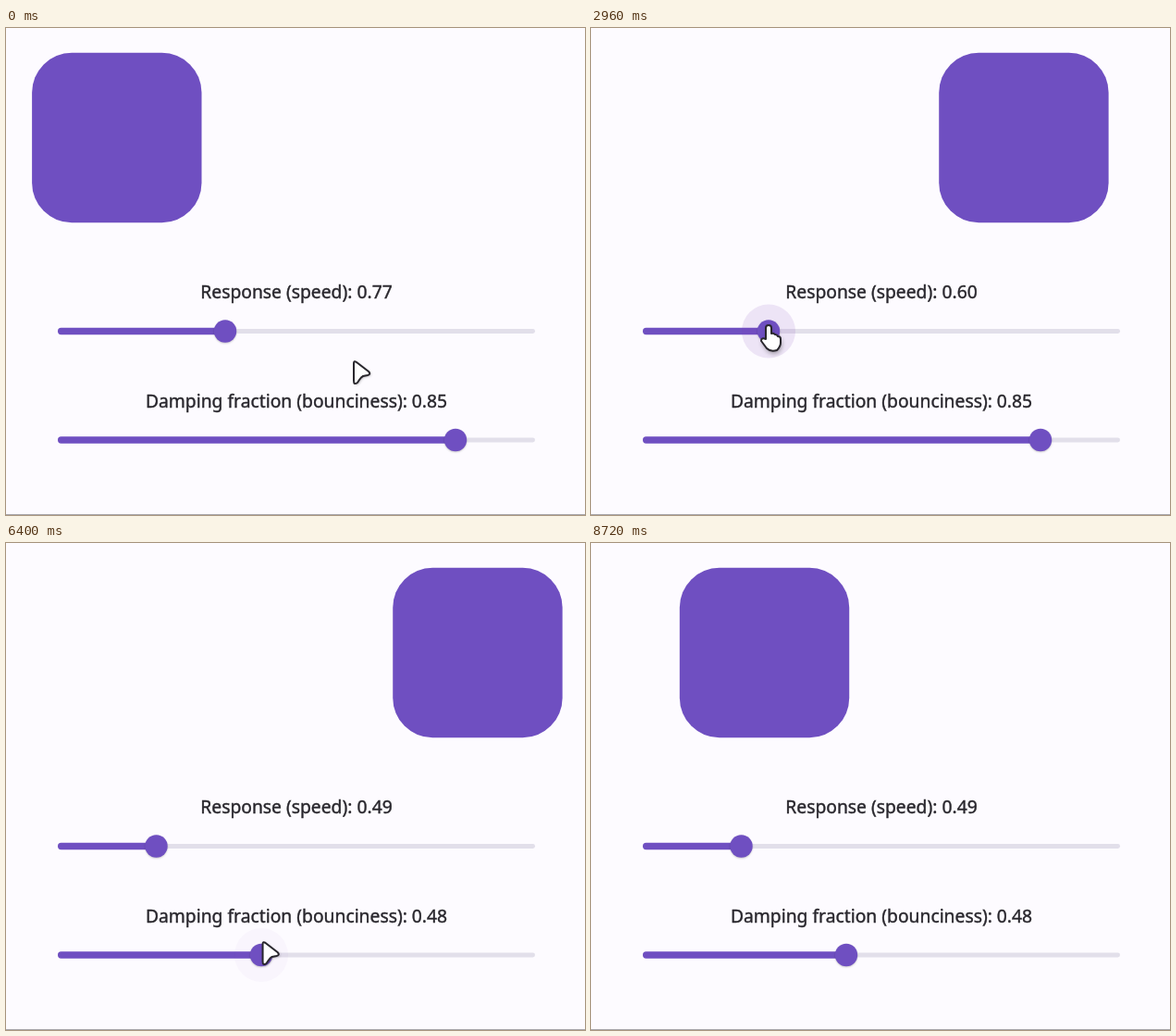
An HTML page with a canvas that plays this animation: 626x526 px, repeating every 8800 ms.

```html
<!DOCTYPE html>
<html lang="en">
<head>
<meta charset="utf-8">
<title>Spring playground</title>
<style>
  html, body { margin: 0; width: 100%; height: 100%; overflow: hidden; background: #fdfbff; }
  canvas { display: block; }
</style>
</head>
<body>
<canvas id="stage" width="626" height="526"></canvas>
<script>
const ctx = document.getElementById('stage').getContext('2d');
const LOOP = 8800, STEP = 80;
const PURPLE = '#6f4fc1', TRACK = '#e2dfea', INK = '#29272d';
const LEFT = 56, RIGHT = 572, CENTER = 314;

// The square jumps back and springs again whenever it has settled
const restarts = [0, 1330, 2661, 3680, 4631, 5494, 6630, 7570, 8668];

const arrow = new Path2D('M0 2Q0 -1 3 1L16 11Q19 14 15 15L10 16Q8 17 6 20L4 23Q0 26 0 21Z');
const hand = new Path2D('M-3 2Q-3 -1 0 -1Q3 -1 3 2V8Q5 7 7 9Q9 9 10 11Q13 11 13 14V18Q13 22 9 26Q2 28 -2 24L-8 16Q-8 12 -3 14Z');

// Goes smoothly from 0 to 1 between two times
function ease(t, from, to) {
  const p = Math.min(1, Math.max(0, (t - from) / (to - from)));
  return p * p * (3 - 2 * p);
}

const sliders = [
  {
    label: 'Response (speed)', y: 327.5, max: 2, grip: 5.5,
    enter: 1760, press: 2000, leave: 4080,
    x: t => 237 - 45 * ease(t, 2080, 2560) - 29.5 * ease(t, 3200, 3900)
  },
  {
    label: 'Damping fraction (bounciness)', y: 445, max: 1, grip: 10,
    enter: 4400, press: 4720, leave: 6400,
    x: t => 486 - 122.5 * ease(t, 4800, 5440) - 87.5 * ease(t, 5560, 6240)
  }
];
const [response, damping] = sliders;

const valueAt = (slider, t) =>
  .1 + (slider.x(t) - LEFT) / (RIGHT - LEFT) * (slider.max - .1);

function spring(seconds, response, damping) {
  const s = 2 * Math.PI / response * seconds, root = Math.sqrt(1 - damping * damping);
  return 1 - Math.exp(-damping * s) * (Math.cos(root * s) + damping / root * Math.sin(root * s));
}

function fillRound(x, y, w, h, r, color) {
  ctx.fillStyle = color;
  ctx.beginPath();
  ctx.roundRect(x, y, w, h, r);
  ctx.fill();
}

const disc = (x, y, r, color) => fillRound(x - r, y - r, 2 * r, 2 * r, r, color);

function shadow(blur, dx, dy, alpha) {
  ctx.shadowColor = `rgba(0,0,0,${alpha})`;
  ctx.shadowBlur = blur;
  ctx.shadowOffsetX = dx;
  ctx.shadowOffsetY = dy;
}

function drawSquare(t) {
  const start = restarts.findLast(time => time <= t);
  const progress = spring((t - start) / 1000, valueAt(response, start), valueAt(damping, start));
  fillRound(28.1 + 390 * progress, 26.8, 183.4, 183.4, 43, PURPLE);
}

function drawSlider(slider, t) {
  const { label, y, enter, press, leave } = slider, x = slider.x(t);
  const text = `${label}: ${valueAt(slider, t).toFixed(2)}`;
  ctx.fillStyle = ctx.strokeStyle = INK;
  ctx.lineWidth = .4;
  ctx.fillText(text, CENTER, y - 35.5);
  ctx.strokeText(text, CENTER, y - 35.5);

  fillRound(LEFT, y - 2.45, RIGHT - LEFT, 4.9, 2.4, TRACK);
  fillRound(LEFT, y - 3.65, x - LEFT, 7.3, 3.6, PURPLE);

  const hover = .07 * ease(t, enter, enter + 80) + .05 * ease(t, press, press + 80);
  const halo = hover * (1 - ease(t, leave - 80, leave + 40));
  disc(x, y, 29, `rgba(120,62,180,${halo})`);
  ctx.save();
  shadow(2, 0, 1, .2);
  disc(x, y, 12.2, PURPLE);
  ctx.restore();
}

function pointerAt(t) {
  let x = 376, y = 360;
  const glide = (toX, toY, from, to) => {
    const p = ease(t, from, to);
    x += (toX - x) * p;
    y += (toY - y) * p;
  };
  glide(364, 362, 0, 1360);
  glide(response.x(t), response.y - response.grip, 1480, 1900);
  glide(damping.x(t), damping.y - damping.grip, 4000, 4620);
  glide(286, 409, 6320, 6640);
  return [x, y];
}

function drawPointer(t) {
  if (t >= 8160) return;
  const isHand = sliders.some(({ enter, leave }) => t >= enter + 80 && t < leave);
  const shape = isHand ? hand : arrow;
  ctx.save();
  ctx.translate(...pointerAt(t));
  ctx.lineWidth = 2;
  ctx.lineJoin = 'round';
  ctx.strokeStyle = INK;
  ctx.fillStyle = '#fff';
  ctx.save();
  shadow(isHand ? 5 : 3, 1, isHand ? 3 : 1, .35);
  ctx.fill(shape);
  ctx.restore();
  ctx.stroke(shape);
  ctx.restore();
}

function draw(t) {
  ctx.fillStyle = '#fdfbff';
  ctx.fillRect(0, 0, 626, 526);
  ctx.fillStyle = '#aaa8ad';
  ctx.fillRect(0, 525, 626, 1);
  ctx.font = '500 19.3px "Noto Sans", "Open Sans", sans-serif';
  ctx.textAlign = 'center';
  drawSquare(t);
  sliders.forEach(slider => drawSlider(slider, t));
  drawPointer(t);
}

function tick() {
  const t = performance.now() % LOOP;
  draw(Math.floor(t / STEP) * STEP);
  requestAnimationFrame(tick);
}
tick();
</script>
</body>
</html>
```
